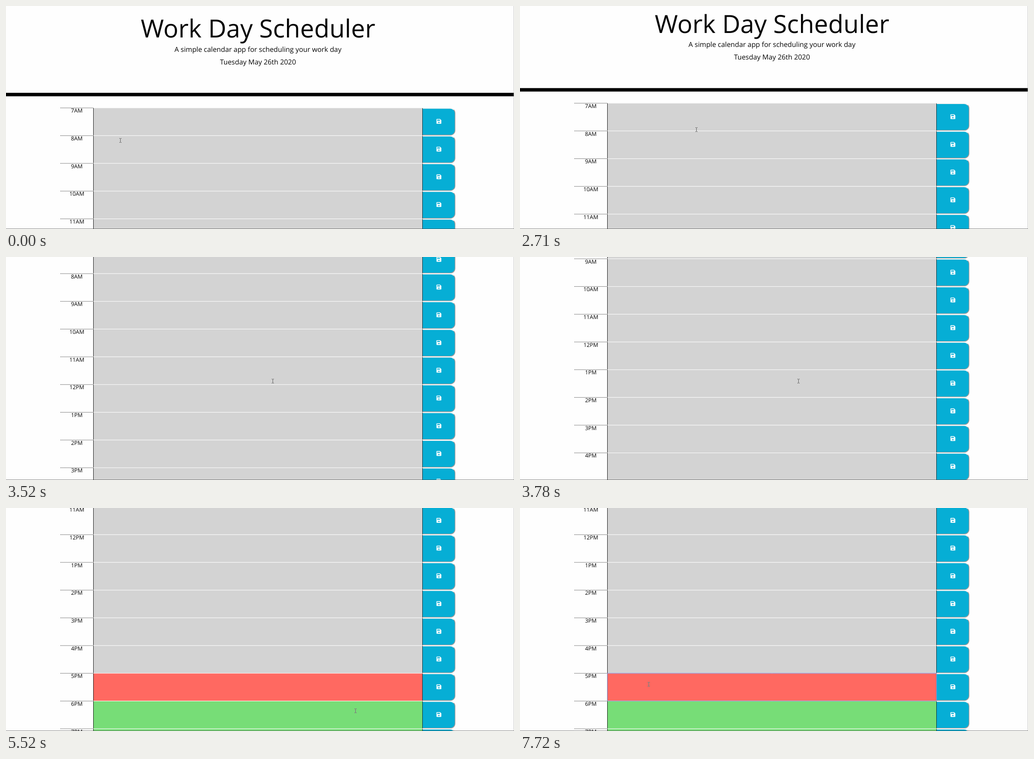
Animation, 1130 px wide and 496 px high, one loop 8000 ms. Source, as an HTML page with a canvas:

```html
<!DOCTYPE html>
<html lang="en">
<head>
<meta charset="utf-8">
<title>Work Day Scheduler</title>
<style>
  html, body { margin: 0; width: 1130px; height: 496px; overflow: hidden; background: #fefefe; }
  canvas { display: block; }
</style>
</head>
<body>
<canvas id="stage" width="1130" height="496"></canvas>
<script>
const ctx = document.getElementById('stage').getContext('2d');
const W = 1130, H = 496, LOOP = 8000;
const PAPER = '#fefefe';
const FONT = '"Open Sans", "Noto Sans", sans-serif';

// The page is laid out in rem and px, zoomed by ZOOM
const ZOOM = 0.771, PX = ZOOM, REM = 16 * ZOOM;
const MID = 560.5, LEFT = 121, TEXT_X = 194, BTN_X = 926.2, RIGHT = 999.7;
const FIRST_ROW = 226.2, PITCH = 80 * ZOOM, NOW = 10, ROWS = 14;

// The screen refreshes in even steps; motion is keyed by step number
const STEP = 132, LEAD = 70;
const FOCUS_STEP = 55, CARET_OFF_STEP = 59;

// [step, scroll]
const SCROLL = [
  [20, 0], [21, 10.5], [25, 128.2], [26, 204], [29, 346.1],
  [30, 396], [32, 396], [34, 473.8], [35, 475.8]
];

// [step, x, y]
const POINTER = [
  [1, 254, 299], [3, 261, 291], [14, 290.5, 277], [19, 306, 276],
  [20, 381, 274], [21, 392.5, 275], [25, 543, 276], [28, 619, 276],
  [35, 622, 278], [39, 637.5, 292.5], [40, 694, 347], [41, 710, 425.5],
  [42, 777, 450.5], [43, 945, 470], [44, 1019, 462], [47, 777, 316],
  [49, 470, 379], [51, 293.5, 356], [53, 286.5, 392]
];

function along(keys, step, field) {
  const i = keys.findIndex(key => key[0] >= step);
  if (i < 0) return keys[keys.length - 1][field];
  if (i === 0) return keys[0][field];
  const a = keys[i - 1], b = keys[i];
  return a[field] + (b[field] - a[field]) * (step - a[0]) / (b[0] - a[0]);
}

function rect(x, y, w, h, color) {
  ctx.fillStyle = color;
  ctx.fillRect(x, y, w, h);
}

function label(text, x, y, size) {
  ctx.font = size + 'px ' + FONT;
  ctx.textAlign = 'center';
  ctx.textRendering = 'geometricPrecision';
  ctx.fillStyle = '#050505';
  ctx.fillText(text, x, y);
}

function shape(points, x, y) {
  ctx.beginPath();
  points.forEach(([px, py]) => ctx.lineTo(x + px, y + py));
  ctx.closePath();
}

function header(s) {
  label('Work Day Scheduler', MID, 70.3 - s, 4.5 * REM);
  label('A simple calendar app for scheduling your work day', MID, 101.9 - s, 1.25 * REM);
  label('Tuesday May 26th 2020', MID, 129.6 - s, 1.25 * REM);
  rect(0, 193.1 - s, W, 10 * PX, '#000');
}

function saveIcon(cx, cy) {
  const d = 14 * PX, x = cx - d / 2, y = cy - d / 2, hole = 2 * PX;
  ctx.beginPath();
  ctx.moveTo(x + 1, y);
  ctx.lineTo(x + 8, y);
  ctx.lineTo(x + d, y + 2.8);
  ctx.arcTo(x + d, y + d, x, y + d, 1.1);
  ctx.arcTo(x, y + d, x, y, 1.1);
  ctx.arcTo(x, y, x + d, y, 1.1);
  ctx.closePath();
  ctx.rect(x + 1.6, y + 1.6, 6.1, 2.4);
  ctx.moveTo(cx + hole, y + 7.7);
  ctx.arc(cx, y + 7.7, hole, 0, Math.PI * 2);
  ctx.fillStyle = '#fff';
  ctx.fill('evenodd');
}

function button(y) {
  const top = y + PX, h = PITCH - PX, w = RIGHT - BTN_X, edge = 2 * PX, r = 15 * PX;
  ctx.beginPath();
  ctx.roundRect(BTN_X, top, w, h, [0, r, r, 0]);
  ctx.fillStyle = '#efefef';
  ctx.fill();
  // Shaded right and bottom edges of the outset border
  ctx.save();
  ctx.clip();
  shape([[0, h], [0, h - edge], [w - 5, 5], [w, 0], [w, h]], BTN_X, top);
  ctx.fillStyle = '#9c9c9c';
  ctx.fill();
  ctx.restore();
  ctx.beginPath();
  ctx.roundRect(BTN_X, top + edge, w - edge, h - 2 * edge, [0, r - edge, r - edge, 0]);
  ctx.fillStyle = '#06aed5';
  ctx.fill();
  rect(BTN_X, top, PX, h, '#000');
  saveIcon((BTN_X + RIGHT) / 2, y + 30.4);
}

function focusRing(y, alpha) {
  ctx.globalAlpha = alpha;
  ctx.strokeStyle = '#7d8be0';
  ctx.lineWidth = 1;
  ctx.strokeRect(TEXT_X + 0.3, y + 0.4, BTN_X - TEXT_X, PITCH);
  ctx.globalAlpha = 1;
}

function row(i, s, step) {
  const y = FIRST_ROW + PITCH * i - s, inner = PITCH - PX;
  const hour = i + 7;

  ctx.strokeStyle = '#000';
  ctx.lineWidth = PX;
  ctx.setLineDash([1.9, 1.1]);
  ctx.beginPath();
  ctx.moveTo(LEFT, y + 0.5);
  ctx.lineTo(TEXT_X, y + 0.5);
  ctx.stroke();
  ctx.setLineDash([]);
  label((hour > 12 ? hour - 12 : hour) + (hour < 12 ? 'AM' : 'PM'), (LEFT + TEXT_X) / 2, y + 11.2, REM);

  const fill = i < NOW ? '#d3d3d3' : i === NOW ? '#ff6961' : '#77dd77';
  rect(TEXT_X, y, BTN_X - TEXT_X, PITCH, fill);
  rect(TEXT_X, y, RIGHT - TEXT_X, 1, '#fff');
  rect(TEXT_X, y + PX, 0.9, inner, '#000');
  button(y);
}

function focusedField(s, step) {
  if (step < FOCUS_STEP) return;
  focusRing(FIRST_ROW + PITCH * NOW - s, step > FOCUS_STEP ? 1 : 0.6);
  if (step < CARET_OFF_STEP) rect(206, 373, 1, 17, '#000');
}

// Text cursor inverts whatever lies below it
function beam(x, y) {
  const ink = 'rgba(255,255,255,0.72)';
  const cx = Math.round(x - 0.5), top = Math.round(y - 5);
  ctx.globalCompositeOperation = 'difference';
  rect(cx, top + 1, 1, 8, ink);
  for (const edge of [top, top + 9]) {
    rect(cx - 2, edge, 2, 1, ink);
    rect(cx + 1, edge, 2, 1, ink);
  }
  ctx.globalCompositeOperation = 'source-over';
}

function outlined(points, x, y) {
  shape(points, x, y);
  ctx.fillStyle = '#fff';
  ctx.fill();
  ctx.strokeStyle = '#000';
  ctx.lineWidth = 0.8;
  ctx.lineJoin = 'round';
  ctx.stroke();
}

const ARROW = [[0, 0], [0, 12.5], [3, 9.8], [5, 14.5], [7, 13.6], [5, 9], [9, 9]];
const HAND = [[-1, 0], [1, 0], [1, 5], [7, 6.5], [7.5, 11], [6, 15.5], [-1, 15.5], [-5, 9], [-3.5, 8], [-1, 10]];

function pointer(step) {
  const x = along(POINTER, step, 1), y = along(POINTER, step, 2);
  if (x > RIGHT) outlined(ARROW, x, y);
  else if (x > BTN_X) outlined(HAND, x, y);
  else beam(x, y);
}

function draw(now) {
  const step = Math.floor((now % LOOP + LEAD) / STEP);
  const s = along(SCROLL, step, 1);

  rect(0, 0, W, H, PAPER);
  header(s);
  for (let i = 0; i < ROWS; i++) row(i, s, step);
  focusedField(s, step);
  pointer(step);
  rect(W - 1, 0, 1, H, 'rgba(190,190,190,0.8)');
  rect(0, H - 1, W, 1, 'rgba(70,70,70,0.65)');
}

let start = null;
function loop(now) {
  if (start === null) start = now;
  draw(now - start);
  requestAnimationFrame(loop);
}
draw(0);
requestAnimationFrame(loop);
</script>
</body>
</html>
```
